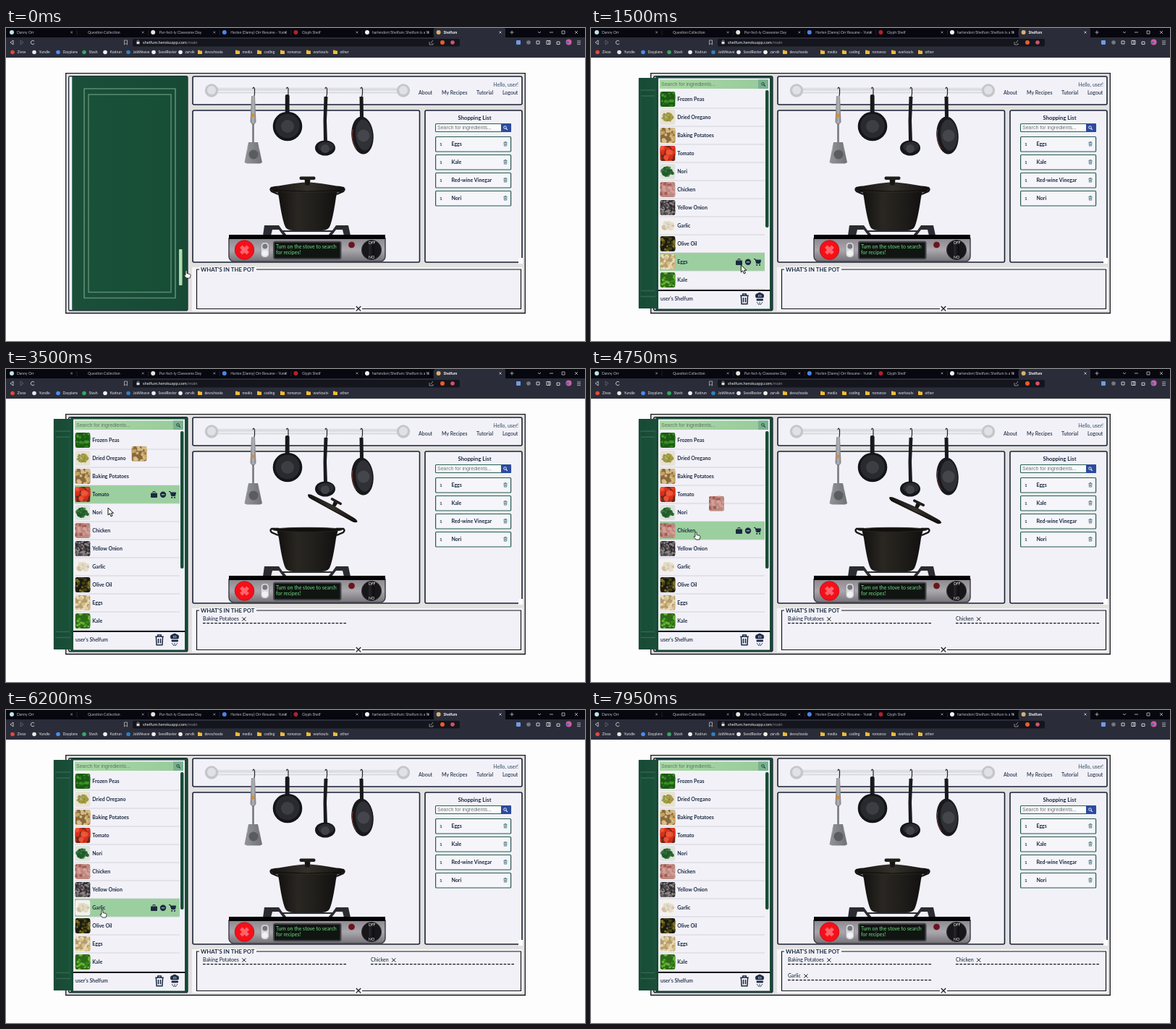
These frames come from a looping animation (800 px wide and 433 px high, 8000 ms). An HTML page with a canvas:

```html
<!DOCTYPE html>
<html lang="en">
<head>
<meta charset="utf-8">
<title>Shelfum</title>
<style>
html, body { margin: 0; width: 100%; height: 100%; overflow: hidden; background: #fdfdfe; }
canvas { display: block; width: 800px; height: 433px; }
</style>
</head>
<body>
<canvas id="stage" width="800" height="433"></canvas>
<script>
const c = document.getElementById('stage').getContext('2d');
const LOOP = 8000, FLIGHT = 1500;
const NAVY = '#1b2942', GREEN = '#174c36', PANEL = '#f2f1f8', INK = '#13151c', TOOLBAR = '#2a2d39';

// name, background, two speckle colours, speckle radius
const FOODS = [
  ['Frozen Peas', '#1d5a14', '#3f9a28', '#2b7a1c', 2],
  ['Dried Oregano', '#e8e2d4', '#a79a3c', '#7f8a35', 1.3],
  ['Baking Potatoes', '#8a6a3c', '#e0c690', '#c9a868', 2.8],
  ['Tomato', '#6d2a18', '#e2301c', '#f0573a', 3.6],
  ['Nori', '#dde4dc', '#1f5a2a', '#3d7a3c', 2.6],
  ['Chicken', '#b98a80', '#d9a09a', '#a8544e', 2.2],
  ['Yellow Onion', '#2d2a30', '#8f8a88', '#54484c', 1.7],
  ['Garlic', '#f3f1ee', '#e4dccb', '#cdbf9d', 2.6],
  ['Olive Oil', '#1c1a10', '#4a4a18', '#8a7a22', 2.2],
  ['Eggs', '#b59c6c', '#efe4c4', '#d8bf8a', 2.6],
  ['Kale', '#2f6a18', '#6fc03a', '#3f8f22', 2]
];
const DROPS = [
  { start: 3040, food: 2, x: 272, y: 348 },
  { start: 4330, food: 5, x: 504, y: 348 },
  { start: 6350, food: 7, x: 272, y: 370 }
];
const POINTER = [
  [0, 248, 336], [1050, 248, 336], [1450, 215, 330], [1750, 170, 318], [2100, 157, 205],
  [2250, 155, 198], [2600, 150, 152], [3300, 150, 152], [3500, 141, 192], [4000, 144, 226],
  [5400, 144, 226], [6000, 132, 277], [7350, 132, 277], [7700, 300, 180]
];

const clamp = v => Math.max(0, Math.min(1, v));
const smooth = v => (v = clamp(v), v * v * (3 - 2 * v));
const mix = (a, b, k) => a + (b - a) * k;

function random(seed) {
  return () => (seed = (seed * 16807) % 2147483647) / 2147483647;
}
function paint(fill, stroke, width = 1) {
  if (fill) { c.fillStyle = fill; c.fill(); }
  if (stroke) { c.strokeStyle = stroke; c.lineWidth = width; c.stroke(); }
}
function box(x, y, w, h, fill, stroke, r = 0, width = 1) {
  c.beginPath();
  c.roundRect(x, y, w, h, r);
  paint(fill, stroke, width);
}
function oval(x, y, rx, ry, fill, stroke, width, turn = 0) {
  c.beginPath();
  c.ellipse(x, y, rx, ry, turn, 0, 7);
  paint(fill, stroke, width);
}
const dot = (x, y, r, fill, stroke, width) => oval(x, y, r, r, fill, stroke, width);
function path(d, fill, stroke, width) {
  const p = new Path2D(d);
  if (fill) { c.fillStyle = fill; c.fill(p); }
  if (stroke) { c.strokeStyle = stroke; c.lineWidth = width || 1; c.stroke(p); }
}
function text(s, x, y, size = 7, color = NAVY, weight = 400, align = 'left', family = 'Lato, sans-serif') {
  c.font = `${weight} ${size}px ${family}`;
  c.fillStyle = color;
  c.textAlign = align;
  c.fillText(s, x, y);
}
function at(x, y, draw, scale = 1) {
  c.save();
  c.translate(x, y);
  c.scale(scale, scale);
  draw();
  c.restore();
}
function gradient(x0, y0, x1, y1, ...colors) {
  const g = c.createLinearGradient(x0, y0, x1, y1);
  colors.forEach((color, i) => g.addColorStop(i / (colors.length - 1), color));
  return g;
}

const cross = (x, y, r, color, w) => path(`M${x - r} ${y - r}l${2 * r} ${2 * r}m0 ${-2 * r}l${-2 * r} ${2 * r}`, null, color, w);
const magnifier = (x, y, color) => { dot(x - .5, y - .5, 1.8, null, color, .9); path(`M${x + .8} ${y + .8}l2 2`, null, color, 1.1); };
const trash = (x, y, scale, color) => at(x, y, () =>
  path('M-5 -4H5M-2 -4V-6H2V-4M-4 -4L-3.4 6H3.4L4 -4M-1.3 -1.5V4M1.3 -1.5V4', null, color, 1.3), scale);

function browser() {
  box(0, 0, 800, 13, '#07070f');
  box(591, 0, 99, 14, TOOLBAR, null, 2);
  box(0, 13, 800, 28, TOOLBAR);
  const tabs = ['Danny Orr', 'Question Collection', 'Pur-fect-ly Clawsome Day', 'Harlen (Danny) Orr Resume - Yund',
    'Glyph Shelf', 'harlendorr/Shelfum: Shelfum is a N', 'Shelfum'];
  const icons = ['#bfe3ea', null, '#e8e4da', '#4a86e8', '#b3202c', '#f4f4f4', '#d9b070'];
  tabs.forEach((label, i) => {
    const x = 8 + 98.6 * i, labelX = i ? x + (i > 4 ? 5 : 6.5) : 15;
    if (icons[i]) dot(x - (i ? 2 : 0), 6, 3, icons[i]);
    c.save();
    c.beginPath(); c.rect(x, 0, 84, 13); c.clip();
    text(label, labelX, 8.2, 5.1, i == 6 ? '#fff' : '#b9b9c2', i == 6 ? 700 : 400);
    c.restore();
    if (i) cross(x - 16, 6, 1.4, '#c8c8cf', .6);
    if (i < 6) path(`M${x + 90} 3v7`, null, '#3d3d48', .5);
  });
  cross(683, 6, 1.5, '#eee', .7);
  path('M696.5 6h5M699 3.5v5M735 5l2 2 2-2M751 6h5M768 4h4v4h-4zM786 4l4 4m0-4l-4 4', null, '#ddd', .7);

  path('M10 17l-4 3 4 3z', null, '#ddd', .8);
  path('M20 17l4 3-4 3z', null, '#666673', .8);
  c.beginPath(); c.arc(37, 20, 2.6, .6, 5.6); paint(null, '#ddd', .9);
  path('M163.5 17h4v6l-2-1.8-2 1.8z', null, '#ccc', .7);
  box(175, 15, 452, 10.5, '#14151d', null, 2);
  box(180.5, 19, 4, 3.2, '#ddd'); path('M181.3 19v-1.5q1.2-1.5 2.4 0V19', null, '#ddd', .6);
  text('shelfum.herokuapp.com', 189, 22.2, 5.8, '#f0f0f3');
  const hostWidth = c.measureText('shelfum.herokuapp.com').width;
  text('/main', 189 + hostWidth, 22.2, 5.8, '#8e8e98');
  path('M585 19v4h5v-2M587 21l3-4', null, '#bbb', .7);
  dot(603, 20, 3, '#f05a28');
  dot(617, 20, 2.8, '#d8506a');
  box(705, 17, 6, 6, '#6f9be8', null, 1);
  dot(722, 20, 2.8, '#777780');
  path('M733 18h4v4h-4zM747 17.5h5v5h-5zM750 17.5v5M761 19h4v3.5h-4z', null, '#ddd', .9);
  dot(777.5, 19.5, 4, '#d65d9c'); dot(776, 20, 2, '#5a68bd');
  path('M789 18h5M789 20.3h5M789 22.6h5', null, '#ddd', .7);

  const marks = [
    [9, 'Zivox', '#e5483a'], [39, 'Yundle', '#e8e8e8'], [72, 'Dayplans', '#4a8df0'], [108, 'Stash', '#35a761'],
    [137, 'Kodrun', '#f2f2f2'], [169, 'JobWeave', '#2f7fc0'], [204, 'SeedRoster', '#eee'], [241, 'zarvik', '#f4f0e8'],
    [268, 'devschoola'], [320, 'media'], [350, 'coding'], [382, 'romance'], [418, 'workouts'], [455, 'other']
  ];
  for (const [x, label, color] of marks) {
    if (color) dot(x, 33.5, 2.8, color);
    else { box(x - 3, 31.5, 6, 4.5, '#f2bd35', null, .6); box(x - 3, 30.7, 2.8, 2, '#f2bd35'); }
    text(label, x + 6.5, 35.3, 5.1, '#e4e4e8');
  }
}

function panels() {
  box(0, 41, 800, 392, '#fdfdfe');
  box(82.7, 62.7, 634.6, 331.8, '#e2e1e0', '#17181d', 0, 1.3);
  for (const [x, y, w, h] of [[86.8, 66.8, 164, 324], [258, 67, 455, 39], [258, 114, 313.5, 210], [579, 114, 134, 210]])
    box(x, y, w, h, PANEL, '#182136', 2, 1.6);
  box(708, 318, 6, 8, '#fdfdfe');
  box(257, 331, 457, 60.5, '#f6f6f9');
  box(263.5, 334, 448, 54.5, PANEL, INK, 0, 1.2);
  box(267, 330, 79, 8, '#f6f6f9');
  text("WHAT'S IN THE POT", 269, 337, 7.8, NAVY, 700);
  box(482, 385, 10, 7, '#f6f6f9');
  cross(487, 388.2, 3.2, INK, 1.3);
}

function thumbnail(i, x, y) {
  const [, back, first, second, r] = FOODS[i], next = random(97 + i * 31);
  c.save();
  c.beginPath(); c.roundRect(x, y, 21, 21, 3); c.clip();
  box(x, y, 21, 21, back);
  const round = i == 1 || i == 4 || i == 7;
  for (let n = 0, count = r < 2 ? 90 : 34; n < count; n++) {
    const a = next() * 6.3, d = Math.sqrt(next()) * (round ? 7.5 : 14);
    c.globalAlpha = .85;
    dot(x + 10.5 + d * Math.cos(a), y + 10.5 + d * Math.sin(a) * (round ? .8 : 1), r * (.6 + next() * .5), n % 3 ? first : second);
  }
  c.restore();
}

function pantry(hover) {
  box(89, 67, 161.5, 323.5, GREEN, null, 2);
  box(93, 69.5, 154, 319, PANEL);
  box(95, 71.5, 150, 12.5, gradient(95, 0, 245, 0, '#a9d8a4', '#98ca9b'));
  box(231, 71.5, 14, 12.5, '#79b18f');
  text('Search for ingredients...', 97, 80.3, 7.05, '#617567', 400, 'left', '"Liberation Sans", sans-serif');
  magnifier(238, 77.8, '#153a35');
  c.save();
  c.beginPath(); c.rect(93, 86, 154, 276); c.clip();
  FOODS.forEach(([name], i) => {
    const y = 86 + 25 * i;
    if (i == hover) {
      box(95, y, 145, 25, '#9ccf9f');
      box(200, y + 10.5, 9, 6.5, NAVY, null, 1);
      path(`M203 ${y + 10}v-1.5h3v1.5`, null, NAVY, .9);
      dot(217, y + 12.8, 4.2, NAVY);
      path(`M214.8 ${y + 12.8}h4.4`, null, '#b8dcb8', 1.1);
      path(`M225 ${y + 8.5}h2l1.6 6h5l1-4.5h-7`, NAVY, NAVY, 1);
      dot(229.2, y + 16.8, 1.1, NAVY); dot(233, y + 16.8, 1.1, NAVY);
    }
    thumbnail(i, 95.5, y + 2);
    text(name, 119.3, y + 15, 7, NAVY, 700);
    path(`M95 ${y + 25}H240`, null, '#c9c9d0', .8);
  });
  c.restore();
  box(241, 86, 4.5, 190, GREEN, null, 2);
  box(92.5, 362, 155, 2, INK);
  text("user's Shelfum", 96, 377, 7, NAVY, 600);
  trash(212, 374.8, 1.15, NAVY);
  path('M228 373q-2-5 2-5.5q3-3 6 0q4 .5 2 5.5zM229 375h8.5v2h-8.5zM229 379l3 4M237 379l-3 4M233 379v4', NAVY, NAVY, .8);
  path('M231.5 369v3M233.2 368.5v3.5M235 369v3', null, PANEL, .6);
}

function door(t) {
  const opening = smooth((t - 150) / 1030), width = Math.cos(opening * 1.733);
  if (opening < .01) box(87.5, 67.5, 4, 322.5, PANEL);
  c.save();
  c.translate(91.5, 228.5);
  c.scale(Math.abs(width) < .01 ? .01 : width, 1 - opening * .014);
  c.translate(0, -228.5);
  box(0, 66.8, 159, 323.4, gradient(0, 0, 159, 0, '#1b4f39', '#174a35'), null, 2);
  const line = `rgba(112,160,132,${mix(.75, .3, opening)})`;
  box(16.5, 84, 126, 289.5, null, line, 0, 1.7);
  box(22.5, 92, 114, 273.5, 'rgba(25,84,56,.35)', line, 0, 1.5);
  if (width > 0) box(147.5, 306, 4.5, 50, '#b3d9ad', null, 1);
  c.restore();
  if (opening > .9) box(90, 68, 3, 321, GREEN);
}

function rack() {
  const steel = gradient(0, 82, 0, 91, '#f8f8fa', '#d5d6da', '#f1f1f4', '#bfc0c5');
  box(284, 83, 265, 7, steel, '#cfd0d4', 0, .5);
  for (const x of [284, 549]) { dot(x, 86.5, 9.2, '#c5c6ca'); dot(x, 86, 6, '#e0e1e4'); }
  text('Hello, user!', 708, 80.5, 7, '#2d4b62', 400, 'right');
  [['About', 570], ['My Recipes', 602], ['Tutorial', 650], ['Logout', 686]].forEach(([s, x]) => text(s, x, 92, 7, NAVY, 500));
  for (const x of [342, 388.5, 442, 491])
    path(`M${x - 1} 84q1-4 2.5 0v7q0 3-2 5`, null, '#25262a', 1.2);

  path('M339 94h5l1.5 36-2 3h-4l-2-3z', gradient(337, 0, 346, 0, '#77797d', '#b1b2b5', '#77797d'));
  dot(341, 121, 2.4, '#d58a3a');
  path('M341.5 132V159', null, '#77797d', 2.6);
  path('M335 158h13l6 28-3 1.5h-18l-3.5-1.5z', gradient(330, 0, 354, 0, '#929396', '#707275'));
  path('M334 163l-1 7M349 163l1.5 7', null, '#c0c1c3', .8);
  dot(342, 175, 6.5, '#5b5c60');

  box(385.8, 92, 5.8, 26, '#17181b', null, 2);
  dot(389, 136, 20.3, '#141518'); dot(389, 135.5, 16.8, '#292a2e'); dot(389, 136, 9, '#3d3e43');

  path('M439.5 95h5l-1.5 33 1 30h-5l-.5-30z', '#191a1d');
  oval(441, 166, 14, 10.5, '#151619'); oval(442, 164.5, 11, 7, '#2b2c30'); dot(441, 167, 6, '#414247');

  path('M488.5 95h5l.5 29h-5z', '#17181b');
  oval(492.5, 148.5, 15.2, 26, '#18191c', null, 1, -.08);
  path('M479 140q-3 15 5 27', null, '#7a3b36', 1);
  oval(494.5, 148, 11.5, 21.5, '#303136', null, 1, -.08);
  dot(494, 149, 8.5, '#45464c');
}

function shopping() {
  text('Shopping List', 647.5, 126.8, 7.7, NAVY, 700, 'center');
  box(593.5, 132.5, 104, 11, '#fbfbfd', '#236150', 1, 1.1);
  text('Search for ingredients...', 596, 140.3, 7.05, '#6b6d75', 400, 'left', '"Liberation Sans", sans-serif');
  box(684, 132, 14, 12, '#2c4b9d', null, 1);
  magnifier(690, 138, '#fff');
  ['Eggs', 'Kale', 'Red-wine Vinegar', 'Nori'].forEach((name, i) => {
    const y = 150.5 + 25 * i;
    box(593.6, y, 104, 20.5, '#f5f5fa', '#23594f', 1, 1.2);
    text('1', 599, y + 12.5, 6.5, NAVY, 600);
    text(name, 615.5, y + 12.7, 7, NAVY, 700);
    trash(690, y + 9.8, .48, '#27576a');
  });
}

function stove() {
  path('M355 287l2-14h20l5 7h69l5-7h17l3 14h-9l-2-8h-9l-6 8h-5l4-5h-65l4 5h-5l-6-8h-9l-2 8z', '#2b2c31');
  box(308, 291, 216, 32, gradient(0, 291, 0, 323, '#8c888e', '#aaa7ad', '#747177'), '#42414a', [0, 0, 7, 7], 1.5);
  box(308, 286, 216, 6, '#030305');
  dot(329.5, 307, 13.3, '#f51019', '#b70e17', .8);
  cross(329.5, 307, 4.7, '#ff646a', 5);
  box(352, 296.5, 11.5, 21, '#d7d7dc', '#87868c', 5, .8);
  dot(357.8, 302, 3.5, '#77777f'); dot(357.8, 311.5, 4, '#f1f1f4');
  box(370, 295.7, 92.5, 23.5, '#101512', '#45454c', 2, 2);
  text('Turn on the stove to search', 373, 305.3, 7, '#72dc82');
  text('for recipes!', 373, 312.5, 7, '#72dc82');
  dot(477.5, 300, 4, '#741019', '#4d2529', .8);
  dot(505, 307, 13.6, '#17171a', '#313138', 1);
  box(501.5, 299, 7, 15, gradient(501, 0, 509, 0, '#2e2e33', '#08080a'));
  text('OFF', 505.5, 299.2, 5, '#fff', 400, 'center');
  text('NO', 505, 318.5, 5, '#fff', 400, 'center');
}

function pot() {
  const iron = gradient(374, 0, 460, 0, '#100f0e', '#2a2722', '#1f1d1a', '#100f0e');
  path('M377 221h-10q-3 2 0 5l9 4M456 221h10q3 2 0 5l-9 4', null, '#161413', 2.4);
  path('M374 222L377 234Q381 262 385 273Q387 280 396 280H437Q446 280 448 273Q452 262 456 234L459 222z', iron);
  oval(416.5, 222.3, 48, 3, '#110f0d', '#2a2723', .8);
}

function lid(lift) {
  c.save();
  c.translate(mix(416.5, 456, lift), mix(223.5, 189, lift));
  c.rotate(lift * .58);
  const k = mix(1, .73, lift);
  c.scale(k, k);
  const dome = mix(1, .6, lift);
  path(`M-51 -2Q-48 -5 -40 -5Q-18 ${-9 * dome} -4 ${-10 * dome}H4Q18 ${-9 * dome} 40 -5Q48 -5 51 -2Q49 ${4 * dome} 43 ${4 * dome}H-43Q-49 ${4 * dome} -51 -2z`,
    gradient(-50, 0, 50, 0, '#161412', '#34302b', '#131110'));
  path(`M-46 ${dome}Q0 ${4 * dome} 46 ${dome}`, null, '#0c0b0a', 1);
  path('M-3 -6l-1-8h8l-1 8z', '#171512');
  box(-11, -18, 22, 4.5, '#211e1a', null, 2);
  c.restore();
}

function contents(t) {
  for (const { start, food, x, y } of DROPS) {
    if (t < start) continue;
    const name = FOODS[food][0];
    text(name, x, y, 7, NAVY, 500);
    cross(x + c.measureText(name).width + 7, y - 2, 2.6, INK, 1);
    c.setLineDash([3.6, 1.8]);
    path(`M${x} ${y + 3.6}h198`, null, INK, 1.3);
    c.setLineDash([]);
  }
}

function flights(t) {
  for (const { start, food } of DROPS) {
    const u = (t - start) / FLIGHT;
    if (u < 0 || u > 1) continue;
    const p = smooth(u * .97 + .03), fromY = 88 + 25 * food;
    thumbnail(food, mix(95, 406, p), mix(fromY, 224, p ** 1.5) - 224 * p * (1 - p));
  }
}

function lidLift(t) {
  return Math.max(...DROPS.map(({ start }) => {
    const u = t - start;
    return Math.min(smooth(u / 600), smooth((1550 - u) / 350));
  }));
}

function pointerAt(t) {
  const i = POINTER.findIndex(k => k[0] > t);
  if (i < 1) return POINTER[i < 0 ? POINTER.length - 1 : 0].slice(1);
  const [t0, x0, y0] = POINTER[i - 1], [t1, x1, y1] = POINTER[i], k = (t - t0) / (t1 - t0);
  return [mix(x0, x1, k), mix(y0, y1, k)];
}

function rowUnderPointer(t) {
  const [x, y] = pointerAt(t);
  return t > 1000 && x > 95 && x < 240 && y > 86 && y < 361 ? Math.floor((y - 86) / 25) : -1;
}

function pointer(t) {
  if (t > 7700) return;
  const [x, y] = pointerAt(t), row = rowUnderPointer(t);
  c.font = '700 7px Lato, sans-serif';
  const hand = t < 1050 || (row >= 0 && x < 121.5 + c.measureText(FOODS[row][0]).width);
  at(x, y, () => hand
    ? path('M0 0q1.3-1.3 2 0v3.5l4 1q1.2 .5 1 2l-1 3.5h-5l-3-4q0-1.5 2 0z', '#fff', '#111', .8)
    : path('M0 0V10l2.3-2.2 1.7 4 2-.8-1.7-3.8h3.2z', '#fff', '#111', 1));
}

function draw(t) {
  browser();
  panels();
  pantry(rowUnderPointer(t - 100)); // the highlight trails the pointer
  door(t);
  rack();
  shopping();
  contents(t);
  stove();
  flights(t);
  pot();
  lid(lidLift(t));
  pointer(t);
}

const began = performance.now();
function tick() {
  draw((performance.now() - began) % LOOP);
  requestAnimationFrame(tick);
}
tick();
</script>
</body>
</html>
```
